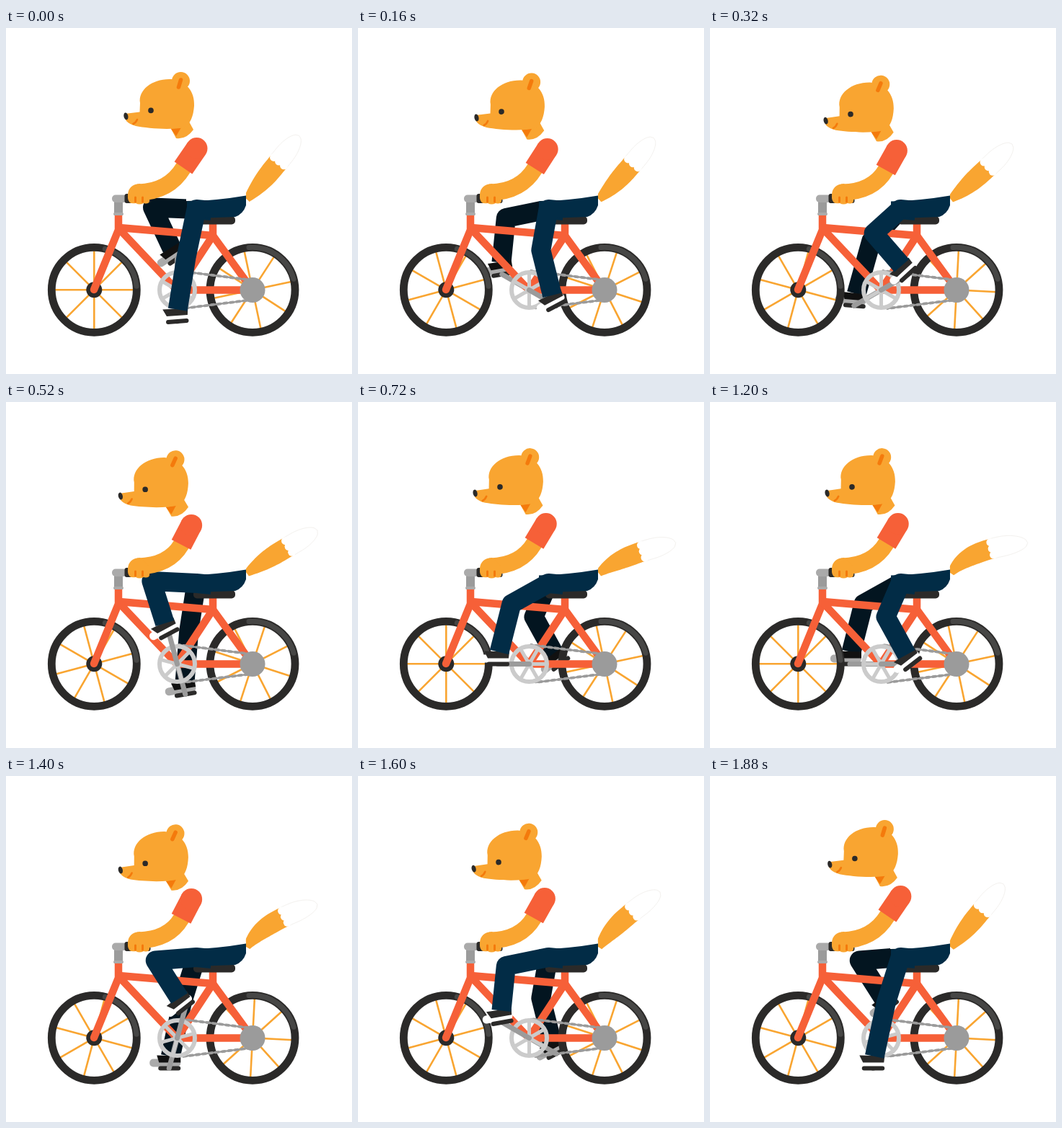
These frames come from a looping animation (480x480 px, 1920 ms). An HTML page:

```html
<!DOCTYPE html>
<html lang="en">
<head>
<meta charset="utf-8">
<title>Cycling fox</title>
<style>
html, body { margin: 0; width: 100%; height: 100%; overflow: hidden; background: #fff; }
svg { display: block; width: 100vw; height: 100vh; }
.line { fill: none; stroke-linecap: round; stroke-linejoin: round; }
</style>
</head>
<body>
<svg viewBox="0 0 480 480">
  <defs>
    <g id="spokes" class="line" stroke="#f9a531" stroke-width="2.6">
      <path id="spoke" d="M-56 0H56"/>
      <use href="#spoke" transform="rotate(45)"/>
      <use href="#spoke" transform="rotate(90)"/>
      <use href="#spoke" transform="rotate(135)"/>
    </g>
    <circle id="tyre" r="59" fill="none" stroke="#2b2a29" stroke-width="10.8"/>
  </defs>

  <path id="tail" fill="#f9a531"/>
  <path id="tailTip" fill="#fff" stroke="#f3f1ee" stroke-width="1"/>
  <g id="scallops" fill="#fff"><circle r="5.5"/><circle r="5.5"/><circle r="5.5"/></g>

  <path id="rearLeg" class="line" stroke="#031520" stroke-width="27" style="stroke-linecap:butt"/>
  <g id="rearFoot">
    <rect x="-27" y="-13" width="43" height="11" rx="5" fill="#aaa"/>
    <path d="M-17-18L16-17V-8H-14Z" fill="#111"/>
    <path class="line" d="M-12 0H13" stroke="#2b2a29" stroke-width="6"/>
  </g>
  <path id="rearCrank" class="line" stroke="#9b9b9b" stroke-width="7"/>
  <path d="M250 160H330L333 233Q292 240 250 240Z" fill="#fff"/>

  <g transform="translate(122.300 363.300)">
    <use id="frontSpokes" href="#spokes"/>
    <use href="#tyre"/>
    <path class="line" d="M15-57A59 59 0 0 1 58.800-5" stroke="#464645" stroke-width="7"/>
    <circle r="11" fill="#2b2a29"/>
  </g>
  <g transform="translate(342 363.300)">
    <use id="backSpokes" href="#spokes"/>
    <use href="#tyre"/>
    <path class="line" d="M-5-58.800A59 59 0 0 1 57-15" stroke="#464645" stroke-width="7"/>
  </g>

  <g class="line" stroke="#f66038" stroke-width="10.5">
    <path d="M156 260V280L122 363"/>
    <path d="M157 277L287 288L342 363.500H237L159 281"/>
    <path d="M287 270V288L239 361"/>
  </g>
  <rect x="260" y="261" width="58" height="11.5" rx="5" fill="#2b2a29"/>

  <g class="line" stroke="#9b9b9b">
    <path d="M240 337L342 350M246 389L342 377" stroke-width="2.4"/>
    <path id="links" d="M240 337L342 350M342 377L246 389" stroke-width="3.8" stroke-dasharray="4 5"/>
  </g>
  <g transform="translate(237.5 363.5)">
    <circle r="24.5" fill="none" stroke="#cbcbcb" stroke-width="6"/>
    <g id="ringSpokes" stroke="#cbcbcb" stroke-width="5">
      <path id="ringSpoke" d="M-23 0H23"/>
      <use href="#ringSpoke" transform="rotate(60)"/>
      <use href="#ringSpoke" transform="rotate(120)"/>
    </g>
    <circle r="6" fill="#cbcbcb"/>
  </g>
  <path id="frontCrank" class="line" stroke="#9b9b9b" stroke-width="7"/>
  <circle cx="342" cy="363.500" r="17.5" fill="#9b9b9b"/>

  <g id="frontFoot">
    <rect x="-26" y="-13" width="42" height="11" rx="5" fill="#fff"/>
    <path d="M-19-18L16-17L15-8H-14Z" fill="#2b2a29"/>
    <path class="line" d="M-12.5 0H13" stroke="#2b2a29" stroke-width="6"/>
  </g>
  <path id="frontLeg" class="line" stroke="#022c46" stroke-width="27" style="stroke-linecap:butt"/>
  <path d="M251 240.500Q292 239.500 333 232.500V246Q329 258 318 262L264 264L251 251Z" fill="#022c46"/>

  <path d="M150 240H162V260H150Z" fill="#9b9b9b"/>
  <rect x="147" y="231.500" width="21" height="10.500" rx="5" fill="#aaa"/>
  <rect x="149" y="256" width="14" height="4" rx="2" fill="#aaa"/>
  <rect x="164.500" y="230" width="36" height="13" rx="3" fill="#2b2a29"/>
  <path id="arm" class="line" stroke="#f9a531" stroke-width="23"/>
  <path d="M169 231Q170 217 186 216L199 228V240Q198 245 191 243Q185 246 180 243Q170 245 169 236Z" fill="#f9a531"/>
  <path class="line" d="M179.500 235V241M189.500 235V241" stroke="#f47a0c" stroke-width="3"/>
  <path id="sleeve" class="line" stroke="#f66038" stroke-width="30" style="stroke-linecap:butt"/>
  <circle id="shoulder" r="15" fill="#f66038"/>

  <g id="head">
    <path d="M228 138L236 153Q250 155 260 141L254 130Z" fill="#f9a531"/>
    <path d="M229 140L243 138L236 150Z" fill="#f47a0c"/>
    <circle id="ear" cx="242.500" cy="73.500" r="12.500" fill="#f9a531"/>
    <path d="M186 104C183 86 203 70 229 71C250 73 262 88 261 108C260 122 256 133 247 138C226 142 196 139 180 136C168 132.500 163 127 165 119L185.500 116.500Z" fill="#f9a531"/>
    <path id="earInner" class="line" d="M242.500 72L239.500 82" stroke="#f47a0c" stroke-width="5.500"/>
    <path class="line" d="M176.500 133Q180 131.500 182 127" stroke="#f47a0c" stroke-width="2.600"/>
    <ellipse cx="166.300" cy="122.500" rx="3" ry="5" transform="rotate(-12 166 122)" fill="#2b2a29"/>
    <circle cx="201" cy="114.400" r="3.800" fill="#2b2a29"/>
  </g>
</svg>
<script>
const LOOP = 1920, TURN = 960, STEP = 40;
const HUB = [237.5, 363.5], CRANK = 43.5, HIP = [264, 251.5];
// Knee position at each eighth of a turn, starting with the pedal at the bottom.
const KNEES = [[250, 318], [256, 312], [244, 298], [219, 277], [203.5, 249], [203, 257], [213, 280], [230, 302]];
const rad = deg => deg * Math.PI / 180;
const el = id => document.getElementById(id);
const set = (id, name, value) => el(id).setAttribute(name, value);
const pt = p => p.map(v => v.toFixed(2)).join(' ');
const poly = points => 'M' + points.map(pt).join('L');

function kneeAt(u) {
  const i = Math.floor(u), f = u - i;
  const [a, b, c, d] = [-1, 0, 1, 2].map(k => KNEES[(i + k + 8) % 8]);
  return [0, 1].map(k => b[k] + f / 2 * (c[k] - a[k] +
    f * (2 * a[k] - 5 * b[k] + 4 * c[k] - d[k] + f * (3 * (b[k] - c[k]) + d[k] - a[k]))));
}

function drawLeg(side, turn) {
  const angle = turn * 360 - 90;
  const pedal = [HUB[0] + CRANK * Math.cos(rad(angle)), HUB[1] - CRANK * Math.sin(rad(angle))];
  const tilt = -19 - 24 * Math.cos(rad(angle - 38));
  const ankle = [pedal[0] + 2 + 16.5 * Math.sin(rad(tilt)), pedal[1] - 16.5 * Math.cos(rad(tilt))];
  set(side + 'Leg', 'd', poly([[285, 253.5], HIP, kneeAt(turn * 8), ankle]));
  set(side + 'Foot', 'transform', `translate(${pt(pedal)}) rotate(${tilt})`);
  set(side + 'Crank', 'd', poly([HUB, pedal]));
}

// The tip swings up and down; the base leads it, which bends the tail.
function drawTail(phase) {
  const tip = rad(34 + 17 * Math.cos(phase)), base = rad(47 - 12 * Math.sin(phase));
  const root = [334, 237.5];
  const bend = [334 + 42 * Math.cos(base), 237 - 42 * Math.sin(base)];
  const end = [335 + 114 * Math.cos(tip), 238 - 114 * Math.sin(tip)];
  const at = (s, side) => {
    const q = 1 - s;
    const p = [0, 1].map(k => q * q * root[k] + 2 * q * s * bend[k] + s * s * end[k]);
    const d = [0, 1].map(k => q * (bend[k] - root[k]) + s * (end[k] - bend[k]));
    const m = side / Math.hypot(...d);
    return [p[0] - d[1] * m, p[1] + d[0] * m];
  };
  const half = s => (5 + 9 * Math.sin(Math.min(1, s / 0.55) * Math.PI / 2)) *
    (s > 0.75 ? Math.sqrt(Math.max(0, 1 - ((s - 0.75) / 0.25) ** 2)) : 1);
  const outline = (from, to) => {
    const left = [], right = [];
    for (let i = 0; i <= 24; i++) {
      const s = from + (to - from) * i / 24;
      left.push(at(s, -half(s)));
      right.unshift(at(s, half(s)));
    }
    return poly([...left, ...right]) + 'Z';
  };
  set('tail', 'd', outline(0, 0.68));
  set('tailTip', 'd', outline(0.66, 1));
  [...el('scallops').children].forEach((c, i) =>
    c.setAttribute('transform', `translate(${pt(at(0.66, (i - 1) * 9))})`));
}

function draw(t) {
  const turn = t % TURN / TURN;
  const lean = (1 - Math.cos(2 * Math.PI * turn)) / 2;
  const spin = -turn * 360;
  drawLeg('front', turn);
  drawLeg('rear', (turn + 0.5) % 1);
  set('frontSpokes', 'transform', `rotate(${spin})`);
  set('backSpokes', 'transform', `rotate(${spin - 12})`);
  set('ringSpokes', 'transform', `rotate(${spin + 90})`);
  set('links', 'stroke-dashoffset', turn * 171);

  const shoulder = [264.5 - 7.5 * lean, 167 + 4 * lean];
  const cuff = [246 - 3 * lean, 194 + 4 * lean];
  set('arm', 'd', `M184 228Q226 227 ${pt(cuff)}`);
  set('sleeve', 'd', poly([shoulder, cuff]));
  set('shoulder', 'transform', `translate(${pt(shoulder)})`);
  set('head', 'transform', `translate(${-8 * lean} ${7 * lean}) rotate(${-2 * lean} 201 114)`);
  for (const id of ['ear', 'earInner']) set(id, 'transform', `rotate(${10 * lean} 239 84)`);
  drawTail(2 * Math.PI * t / LOOP);
}

let start;
function tick(now) {
  start ??= now;
  draw(Math.floor((now - start) / STEP) * STEP % LOOP);
  requestAnimationFrame(tick);
}
draw(0);
requestAnimationFrame(tick);
</script>
</body>
</html>
```
